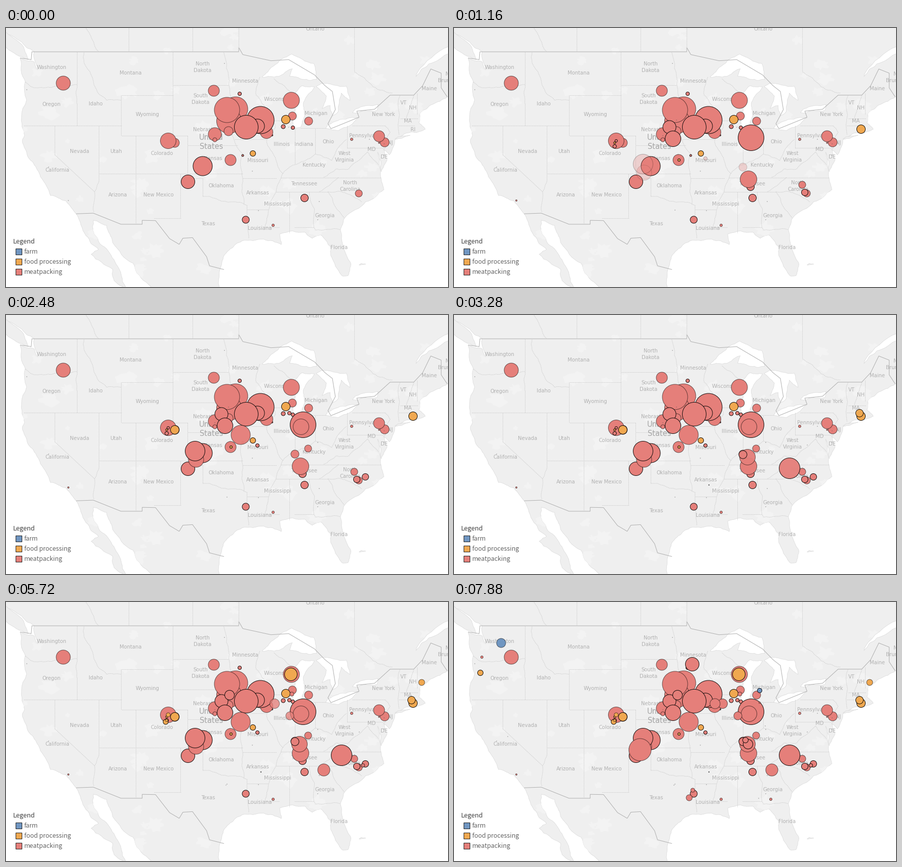
Recreate the animation shown at these times as a matplotlib script. Size 872 by 512 pixels, loop 8 s.

```python
import numpy as np
import matplotlib.pyplot as plt
from matplotlib.animation import FuncAnimation
from matplotlib.collections import LineCollection, PolyCollection
from matplotlib.colors import to_rgb
from matplotlib.patches import Polygon, Rectangle

WIDTH, HEIGHT, DPI = 872, 512, 64
PX = 72 / DPI
STEP, LOOP = 40, 8000
RED, ORANGE, BLUE = "#e57f7a", "#f0a850", "#7096c1"
LAND, WATER = "#efefef", "#ffffff"

rng = np.random.default_rng(7)
fig = plt.figure(figsize=(WIDTH / DPI, HEIGHT / DPI), dpi=DPI, facecolor=WATER)
ax = fig.add_axes([0, 0, 1, 1])
ax.set_xlim(0, WIDTH)
ax.set_ylim(HEIGHT, 0)
ax.axis("off")


def project(*degrees):
    """Web Mercator: pairs of west longitude and latitude to stage pixels."""
    west, lat = np.reshape(degrees, (-1, 2)).T
    merc = np.log(np.tan(np.pi / 4 + np.radians(lat) / 2))
    return np.column_stack([1848.4 - 14.6 * west, 870 - 836.5 * merc])


def roughen(points, levels=3, amount=0.09):
    """Midpoint displacement, so that a few points give a natural outline."""
    for _ in range(levels):
        delta = np.diff(points, axis=0)
        shift = rng.uniform(-amount, amount, (len(delta), 1))
        middle = points[:-1] + delta / 2 + shift * delta[:, ::-1] * [-1, 1]
        merged = np.empty((2 * len(points) - 1, 2))
        merged[::2], merged[1::2] = points, middle
        points = merged
    return points


def area(points, color, zorder):
    shape = Polygon(points, closed=True, facecolor=color, edgecolor="#dadada",
                    linewidth=0.7 * PX, zorder=zorder)
    return ax.add_patch(shape)


def line(points, color="#cfcfcf", width=0.8, style=(0, (3, 1))):
    ax.add_collection(LineCollection([points], colors=color, linewidths=width * PX,
                                     linestyles=[style], zorder=3))


def island(*degrees):
    area(roughen(project(*degrees)), LAND, 1)


def lake(*degrees):
    area(roughen(project(*degrees, *degrees[:2])), WATER, 2)


def river(*degrees):
    line(roughen(project(*degrees)))


def country(*degrees):
    line(project(*degrees), "#b0b0b0", 1, "solid")


# Coastline
pacific = project(
    128, 51.2, 124.7, 49.95, 122.8, 49, 122.3, 47.3, 122.8, 48.1, 124.7, 48.4,
    124, 46.3, 124.5, 42.8, 124.1, 41, 124.4, 40.4, 123.7, 38.9, 122.5, 37.6,
    121.9, 36.6, 120.6, 34.6, 118.5, 34, 117.1, 32.5)
baja = project(
    115.8, 30, 114.1, 28.4, 115.1, 27.8, 112.2, 26, 112, 24.6, 110, 23,
    111.3, 26, 112.8, 28.2, 114.7, 30.2, 114.8, 31.8, 113, 31.2, 112.2, 29.2,
    109.4, 26.7, 108.9, 25.5, 106.4, 23.3)
gulf = project(
    97.8, 23.3, 97.4, 27, 96.3, 28.45, 94.7, 29.4, 91.8, 29.6, 89.4, 28.95,
    89.6, 30.2, 86.2, 30.4, 85.2, 29.7, 84.1, 30.1, 82.7, 28.6, 82.7, 27.6,
    81.8, 26, 81.1, 25.15)
atlantic = project(
    80.4, 25.2, 80.05, 26.8, 81.4, 30.6, 80.8, 32.1, 78, 33.9, 75.55, 35.25,
    76, 36.9, 76.4, 39.3, 75.9, 37.2, 75.1, 38.5, 75.5, 39.5, 74.8, 39,
    74, 40.7, 71.9, 41.35, 69.95, 41.65, 70.8, 42.3, 70.6, 43.3, 69, 44.1,
    67, 44.8, 65, 45.3)
sides = np.array([[900, -30], [-30, -30]])
coast = roughen(np.vstack([pacific, baja, gulf, atlantic]))
land = area(np.vstack([coast, sides]), LAND, 1)

island(128.3, 50.8, 126.6, 49.4, 123.6, 48.3, 124.2, 49.4, 127, 50.9)
island(74, 40.6, 72, 41.03, 73.7, 40.85)
island(78.9, 26.5, 78, 26.6, 78.6, 26.7)

# Faint terrain
angles = np.linspace(0, 2 * np.pi, 18, endpoint=False)
blobs = []
for _ in range(85):
    radius = rng.uniform(4, 17) * rng.uniform(0.5, 1.2, angles.size)
    center = rng.uniform((0, 0), (WIDTH, HEIGHT))
    blobs.append(center + np.column_stack([1.3 * radius * np.cos(angles),
                                           radius * np.sin(angles)]))
terrain = PolyCollection(blobs, facecolors="#f3f3f3", edgecolors="none", zorder=1.2)
ax.add_collection(terrain)
terrain.set_clip_path(land)

# Great Lakes and the St. Lawrence
lake(92, 46.7, 90.4, 46.7, 87.9, 47.47, 88.3, 46.8, 86.5, 46.5, 84.6, 46.5,
     85, 47.95, 88, 48.8, 90.5, 47.7)
lake(87.6, 41.7, 86.8, 41.8, 86.25, 43, 86.4, 44.3, 84.9, 45.8, 86.6, 45.9,
     88, 44.55, 87.2, 45, 87.9, 43)
lake(84.7, 45.8, 83.3, 44.9, 83.9, 43.7, 82.8, 44, 82.45, 43, 81.7, 43.4,
     81.3, 45.2, 80.1, 44.5, 80.6, 45.85, 84, 46.1)
lake(83.4, 41.75, 81.7, 41.5, 78.9, 42.8, 81.3, 42.65, 83.1, 42.1)
lake(79.8, 43.3, 76.5, 43.5, 76.3, 44.1, 79.4, 43.65)
lake(71.2, 46.75, 69.5, 47.9, 65, 49.2, 65, 50.3, 69.7, 48.2)

# National borders
country(124.7, 48.45, 123.2, 48.3, 123.1, 49, 95.15, 49, 95.15, 49.38, 94.6, 48.75,
        90.8, 48.2, 88.4, 48.3, 84.9, 46.9, 83.5, 45.9, 82.5, 45.35, 82.1, 43.6,
        83.1, 42.2, 82.7, 41.7, 78.9, 42.85, 79.2, 43.45, 76.8, 43.63, 74.7, 45,
        71.5, 45, 70.3, 45.9, 69.2, 47.45, 67.8, 47.07, 67.8, 45.7, 67, 44.85)
country(117.12, 32.53, 114.8, 32.6, 111.07, 31.33, 108.2, 31.33, 108.2, 31.78,
        106.4, 31.75, 104.5, 29.65, 103.2, 28.98, 102.7, 29.7, 101.4, 29.77,
        99.5, 27.5, 99.1, 26.4, 97.15, 25.95)

# Straight state borders: along a latitude, then along a longitude
for lat, west, east in (
    (42, 124.2, 111), (37, 114, 94.6), (41, 111, 102), (40, 102, 95.3),
    (45, 111, 104), (45.94, 104, 96.6), (43, 104, 98), (43.5, 96.5, 91.2),
    (40.6, 95.7, 91.5), (36.5, 94.6, 90), (33, 94, 91.2), (42.5, 90.6, 87.8),
    (41.73, 86.8, 83.4), (39.72, 80.5, 75.6), (42, 79.8, 75.4),
    (36.55, 89.5, 75.9), (35, 90.1, 83.1), (31, 91.6, 89.7), (31, 87.6, 85),
    (42.74, 73.3, 70.9), (42.03, 73.5, 71.4), (32, 106.6, 103), (36.5, 103, 100),
):
    line(project(west, lat, east, lat))
for west, north, south in (
    (117.04, 49, 46), (117.04, 44.2, 42), (120, 42, 39), (114.05, 42, 36.2),
    (111.05, 45, 41), (109.05, 41, 31.3), (104.05, 49, 41), (103.04, 37, 32),
    (102.05, 41, 37), (100, 36.5, 34.5), (94.04, 33.5, 31.9), (87.53, 41.7, 38),
    (84.8, 41.7, 39.1), (80.52, 42, 39.7), (88.3, 35, 30.3), (110, 52, 49),
    (101.4, 52, 49), (95.15, 52, 49), (79.52, 52, 47.2), (71.05, 45.2, 43.1),
):
    line(project(west, north, west, south))
line(project(120, 39, 114.63, 35))

# Winding state borders
river(124, 46.25, 122.8, 45.7, 121.5, 45.7, 119.2, 46, 117, 46, 117.04, 44.2)
river(116.05, 49, 116.05, 48, 114.5, 45.7, 113, 44.5, 111.05, 44.5)
river(114.05, 36.2, 114.63, 35, 114.72, 32.72)
river(100, 34.5, 96.6, 33.85, 94.04, 33.5)
river(97.2, 49, 96.5, 46, 96.45, 42.5, 94.62, 39.1, 94.62, 36.5, 94.45, 33.6)
river(94.04, 31.9, 93.8, 29.7)
river(92.3, 46.7, 92.8, 45, 91.2, 43.5, 90.2, 41.8, 91.4, 40.4, 90.2, 38.7,
      89.2, 37, 90.1, 35, 91.1, 33, 91.6, 31)
river(90.4, 46.55, 87.6, 45.1)
river(89.2, 37, 87.9, 37.9, 84.8, 39.1, 82.6, 38.4, 80.6, 40.6)
river(75.4, 42, 74.7, 41.36, 75.1, 40.8, 74.75, 40.2, 75.6, 39.5)
river(83.68, 36.6, 82, 37.5, 80.3, 37.5, 77.75, 39.3, 76.3, 37.95)
river(81.68, 36.59, 84.32, 35)
river(83.1, 35, 80.8, 34.9, 78.55, 33.87)
river(83.1, 35, 80.9, 32.05)
river(85.6, 35, 85, 31, 84.8, 30.65, 81.45, 30.7)
river(73.35, 45, 73.5, 41.1)
river(71.5, 45, 72.5, 42.73)
river(114.06, 49, 116, 51.2)
river(74.4, 45.2, 77, 45.8, 79.52, 47.2)


def label(text, x, y, size=10, color="#b2b2b2", leading=13, **style):
    style = {"ha": "center", "family": "DejaVu Sans", **style}
    rows = text.split("\n")
    top = y + 0.36 * size - leading * (len(rows) - 1) / 2
    for i, row in enumerate(rows):
        ax.text(x, top + i * leading, row, fontsize=size * PX, color=color,
                va="baseline", zorder=4, **style)


for text, x, y in (
    ("Washington", 90, 77), ("Montana", 246, 88), ("North\nDakota", 388, 77),
    ("Minnesota", 472, 104), ("South\nDakota", 384, 140), ("Oregon", 90, 150),
    ("Idaho", 177, 149), ("Wyoming", 279, 170), ("Wisconsin", 534, 140),
    ("Michigan", 612, 168), ("Nebraska", 393, 200), ("Kansas", 409, 257),
    ("Missouri", 497, 261), ("Illinois", 544, 229), ("Indiana", 588, 229),
    ("Ohio", 636, 224), ("Pennsylvania", 710, 212), ("New York", 745, 170),
    ("VT", 784, 147), ("NH", 803, 157), ("MA", 793, 183), ("RI", 803, 200),
    ("NJ", 758, 226), ("MD", 721, 239), ("DE", 746, 254),
):
    label(text, x, y)
for text, x, y in (
    ("West\nVirginia", 668, 254), ("Kentucky", 608, 270), ("Tennessee", 588, 307),
    ("North\nCarolina", 679, 312), ("Arkansas", 497, 325),
    ("Mississippi", 536, 347), ("Oklahoma", 425, 311), ("Texas", 399, 386),
    ("Louisiana", 501, 395), ("Georgia", 629, 370), ("Florida", 657, 433),
    ("New Mexico", 301, 329), ("Arizona", 221, 329), ("Utah", 217, 243),
    ("Nevada", 145, 243), ("Colorado", 308, 247), ("California", 101, 280),
    ("Maine", 835, 119), ("Ontario", 610, 1), ("New\nBrunswick", 878, 97),
):
    label(text, x, y)
label("United\nStates", 405, 225, 14.5, "#a6a6a6", 18)

legend_style = {"ha": "left", "family": "Noto Sans CJK JP"}
label("Legend", 14, 421.5, 12.8, "#444444", **legend_style)
for row, (name, color) in enumerate((("farm", BLUE), ("food processing", ORANGE),
                                     ("meatpacking", RED))):
    y = 441.5 + 20 * row
    ax.add_patch(Rectangle((18.5, y - 6), 12, 12, facecolor=color,
                           edgecolor="#222222", linewidth=PX, zorder=4))
    label(name, 36, y, 12.4, "#666666", **legend_style)

# Marks: x, y, radius, kind. Upper-case kinds have a dark outline, lower-case a soft one.
FILL = {"r": RED, "o": ORANGE, "b": BLUE, "d": "#555555"}
marks = []


def appear(span, *rows):
    marks.extend((*row, *span) for row in rows)


def dots(span, *points):
    appear(span, *((x, y, 1.1, "d") for x, y in points))


span = (-2, -1)
appear(span,
       (113, 109, 14.5, "r"), (410, 124, 11.5, "r"), (461, 130, 4, "R"),
       (453, 160, 24.5, "r"), (440, 184, 25, "r"), (436, 162, 25.5, "r"),
       (525, 212, 2, "R"), (514, 206, 13, "r"), (502, 182, 27.5, "R"),
       (496, 194, 14.5, "R"), (474, 196, 24, "R"), (563, 143, 16.5, "r"),
       (565, 174, 8.5, "r"), (597, 184, 8.5, "r"), (552, 181, 9, "O"),
       (547, 195, 4.5, "R"), (566, 197, 4, "R"), (412, 210, 13.5, "r"))
appear(span,
       (412, 221, 4.5, "r"), (439, 204, 9.5, "r"), (333, 227, 9.5, "r"),
       (320, 223, 16, "r"), (388, 273, 19.5, "R"), (359, 304, 14, "R"),
       (443, 261, 11.5, "r"), (487, 248, 6, "O"), (467, 252, 2.5, "R"),
       (589, 336, 8, "R"), (473, 379, 7.5, "R"), (527, 390, 3, "r"),
       (696, 327, 7.5, "r"), (682, 220, 3, "r"), (747, 226, 9.5, "r"),
       (736, 214, 11.5, "r"), (736, 227, 1.8, "r"))
dots(span, (431, 70), (41, 122), (84, 275), (123, 341), (486, 283), (498, 361),
     (618, 343), (615, 379), (717, 220), (746, 251), (558, 196), (746, 229))

span = (40, 800)
appear(span,
       (585, 314, 8, "R"), (581, 299, 17, "r"), (586, 217, 26, "R"),
       (803, 200, 9, "O"), (687, 310, 7.5, "r"), (692, 325, 7, "R"),
       (425, 196, 13.5, "R"), (432, 219, 16, "R"), (320, 223, 3, "R"),
       (317, 227, 2.5, "O"), (317, 234, 4, "R"), (444, 261, 3, "O"),
       (123, 341, 2, "r"))
dots(span, (439, 182), (442, 250), (444, 261), (436, 360), (412, 213))

appear((880, 1560),
       (375, 286, 15.5, "r"), (373, 269, 20, "R"), (570, 275, 8.5, "r"),
       (496, 258, 4, "R"))

span = (1840, 2640)
appear(span,
       (463, 237, 19.5, "r"), (333, 227, 9, "O"), (582, 221, 16, "r"),
       (596, 264, 7.5, "r"), (709, 320, 7, "R"), (559, 194, 4, "R"))
dots(span, (615, 252))

span = (2680, 3440)
appear(span,
       (579, 281, 16, "r"), (570, 276, 8.5, "R"), (662, 303, 21, "R"),
       (800, 194, 8, "O"), (503, 336, 1.7, "d"))
dots(span, (697, 257))

appear((3600, 4040),
       (441, 184, 10, "R"), (315, 237, 5.5, "O"), (317, 234, 3, "o"),
       (320, 223, 4.5, "o"))

appear((4400, 5200),
       (562, 143, 13, "O"), (820, 159, 6.5, "o"), (627, 332, 12.5, "r"),
       (564, 182, 4.5, "r"))

span = (5280, 6000)
appear(span, (530, 201, 10, "r"), (560, 225, 8.5, "r"), (704, 323, 4, "R"))
dots(span, (434, 362))

appear((6280, 7080), (93, 81, 9.5, "b"), (52, 140, 6, "O"), (603, 175, 5, "B"))

span = (7160, 7880)
appear(span,
       (55, 109, 3, "r"), (470, 123, 14, "R"), (515, 201, 10.5, "r"),
       (367, 292, 22.5, "r"), (464, 387, 6.5, "r"), (471, 372, 4.5, "r"),
       (580, 281, 10, "R"), (575, 273, 6, "R"), (625, 390, 3, "r"),
       (603, 199, 2, "r"))
dots(span, (614, 245), (601, 388), (106, 266))

xs, ys, radii, kinds, starts, ends = map(np.array, zip(*marks))
fill = np.ones((len(marks), 4))
fill[:, :3] = [to_rgb(FILL[kind.lower()]) for kind in kinds]
outline = np.zeros((len(marks), 4))
outline_alpha = np.array([0 if k == "d" else 0.9 if k.isupper() else 0.55 for k in kinds])
bubbles = ax.scatter(xs, ys, s=((2 * radii - 1) * PX) ** 2, linewidths=PX, zorder=5)


def update(frame):
    progress = np.clip((frame * STEP - starts) / (ends - starts), 0, 1)
    opacity = np.where(progress < 0.5, 4 * progress ** 3, 1 - 4 * (1 - progress) ** 3)
    fill[:, 3] = opacity
    outline[:, 3] = opacity * outline_alpha
    bubbles.set_facecolor(fill)
    bubbles.set_edgecolor(outline)
    return (bubbles,)


update(0)
animation = FuncAnimation(fig, update, frames=LOOP // STEP, interval=STEP,
                          repeat=True, repeat_delay=0, blit=False)
plt.show()
```
